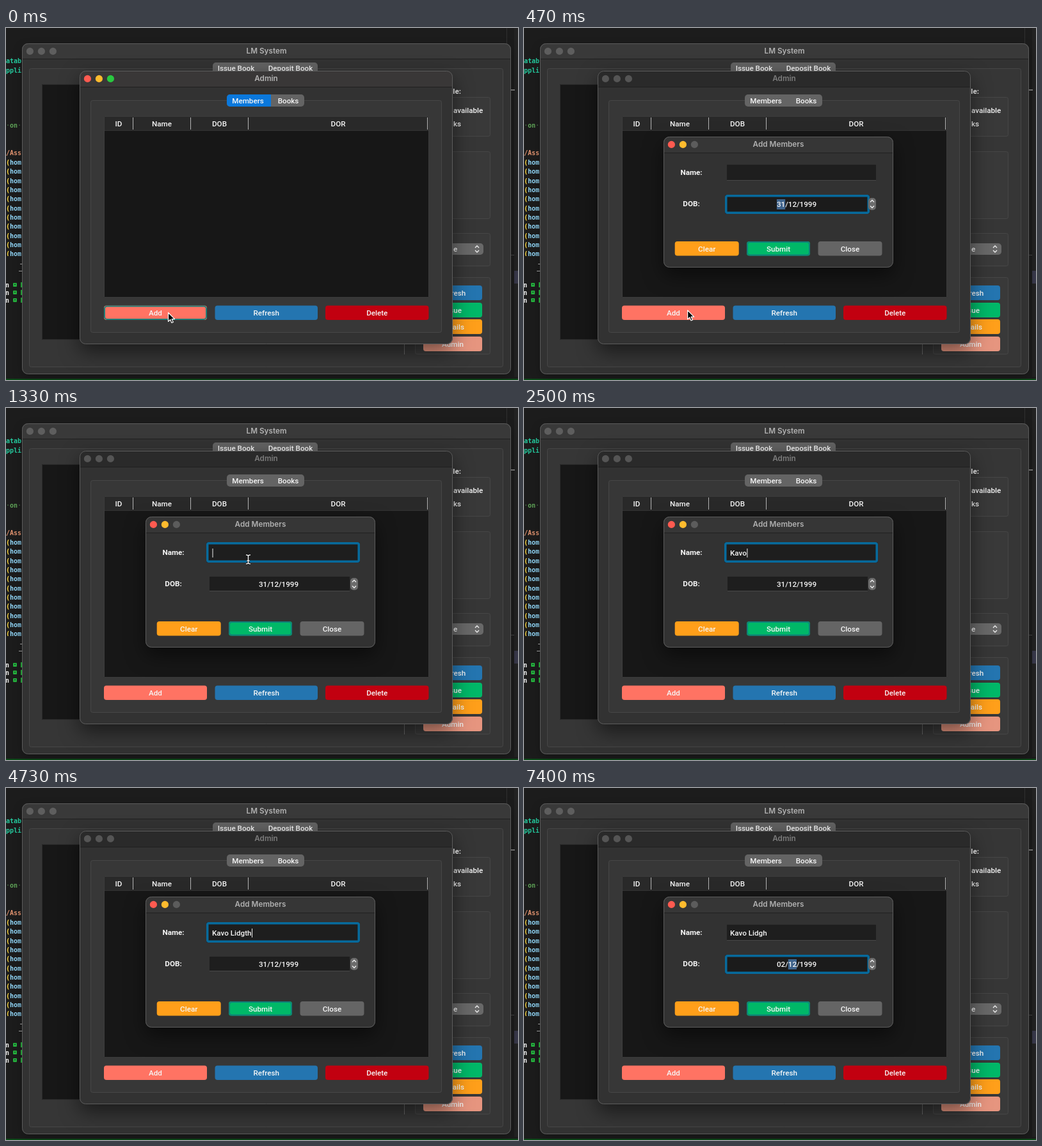
Write an HTML page with a canvas that moves like this. It is 800 px wide and 551 px high and loops after 8 s.

```html
<!DOCTYPE html>
<html lang="en">
<head>
<meta charset="utf-8">
<title>Library admin</title>
<style>
  html, body { margin: 0; width: 100%; height: 100%; overflow: hidden; background: #1c1c1c; }
  canvas { display: block; }
</style>
</head>
<body>
<canvas id="stage" width="800" height="551"></canvas>
<script>
const ctx = document.getElementById('stage').getContext('2d');
const LOOP = 8000, DIALOG_AT = 340, NAME_AT = 1300, DOB_AT = 6000;
const ROBOTO = 'Roboto, sans-serif', INTER = 'Inter, sans-serif', MONO = '"DejaVu Sans Mono", monospace';
const BLUE = '#2475b0', GREEN = '#00b868', ORANGE = '#ff9f1a', RING = '#076a9c', TEAL = '#207f78';

// '<' is a backspace
const KEYS = 'Kavo Lidgth<<<gth<<h';
const KEY_TIMES = [1700, 1930, 2200, 2500, 2630, 2900, 3070, 3230, 3430, 3530, 3630,
  4000, 4170, 4300, 4570, 4630, 4730, 5300, 5470, 5730];

const clamp = v => Math.max(0, Math.min(1, v));

function box(x0, y0, x1, y1, fill, { r = 0, stroke, lw = 1 } = {}) {
  if (fill) {
    ctx.beginPath();
    ctx.roundRect(x0, y0, x1 - x0, y1 - y0, r);
    ctx.fillStyle = fill;
    ctx.fill();
  }
  if (stroke) {
    ctx.beginPath();
    ctx.roundRect(x0 + lw / 2, y0 + lw / 2, x1 - x0 - lw, y1 - y0 - lw, r);
    ctx.strokeStyle = stroke;
    ctx.lineWidth = lw;
    ctx.stroke();
  }
}

function setFont(weight = 500, family = ROBOTO, size = 11.65) {
  ctx.font = `${weight} ${size}px ${family}`;
}

function text(s, x, y, { color = '#f6f6f6', weight, family, size, align = 'center' } = {}) {
  setFont(weight, family, size);
  ctx.textAlign = align;
  ctx.fillStyle = color;
  ctx.fillText(s, x, y + 4.3);
}

function button(s, x0, y0, x1, y1, fill, stroke) {
  box(x0, y0, x1, y1, fill, { r: 4, stroke, lw: 2 });
  text(s, (x0 + x1) / 2, (y0 + y1) / 2);
}

function lights(x, y, colors) {
  colors.forEach((c, i) => {
    ctx.beginPath();
    ctx.arc(x + i * 18, y, 5.6, 0, 7);
    ctx.fillStyle = c;
    ctx.fill();
  });
}

function windowFrame(x0, y0, x1, y1, bar, barColor, title, titleColor, colors, shadow = 0.5) {
  ctx.save();
  ctx.shadowColor = `rgba(0,0,0,${shadow})`;
  ctx.shadowBlur = 60 * shadow;
  ctx.shadowOffsetY = 24 * shadow;
  box(x0, y0, x1, y1, '#323232', { r: 9 });
  ctx.restore();
  box(x0, y0, x1, y0 + bar, barColor, { r: [9, 9, 0, 0] });
  box(x0, y0 + bar, x1, y0 + bar + 1, '#202020');
  box(x0, y0, x1, y1, null, { r: 9, stroke: '#5c5c5c' });
  lights(x0 + 12.4, y0 + 12.4, colors);
  text(title, (x0 + x1) / 2, y0 + 12, { color: titleColor, weight: 600, family: INTER, size: 11.75 });
}

function chevrons(x, y, gap) {
  ctx.beginPath();
  for (const d of [-1, 1]) {
    ctx.moveTo(x - 3, y + d * gap);
    ctx.lineTo(x, y + d * (gap + 3));
    ctx.lineTo(x + 3, y + d * gap);
  }
  ctx.strokeStyle = '#f0f0f0';
  ctx.lineWidth = 1.3;
  ctx.stroke();
}

function desktop() {
  box(0, 0, 800, 551, '#1c1c1c');
  box(782, 0, 783, 24, '#303030');
  box(794, 0, 800, 546, '#222');
  box(788, 96, 795, 98, '#777');
  box(788, 355, 794, 356, '#444');
  box(794, 380, 800, 400, '#38384a');
  box(0, 549, 800, 551, '#0c4a18');

  const code = (s, x, y, color) =>
    text(s, x, y, { color, weight: 700, family: MONO, size: 10, align: 'left' });
  code('atab', 0, 51, '#25cda0');
  code('ppli', 0, 66, '#25cda0');
  code('on', 6, 152, '#5fa558');
  code('·', 0, 152, '#3c5c3c');
  code('·', 18, 152, '#3c5c3c');
  code('/Ass', 0, 195, '#e0926f');
  for (let i = 0; i < 11; i++) {
    const y = 209.5 + i * 14.35;
    code('(', 0, y, '#ffd83c');
    code('hom', 6, y, '#92d8fa');
  }
  box(0, 357, 25, 362, '#1c1c1c');
  box(22, 369, 25, 370, '#aaa');
  box(20, 380, 25, 381, '#aaa');
  for (const y of [402, 414, 426]) {
    code('n', -1, y, '#eee');
    box(11, y - 3, 17, y + 3, '#25b03c', { r: 1 });
    box(13, y - 1, 15, y, '#123');
    box(23, y - 4, 25, y + 4, '#25b03c');
  }
}

function mainWindow() {
  const gray = '#5e5e5e', edge = '#464646';
  windowFrame(25, 24, 789, 542, 24, '#393939', 'LM System', '#b2b2b2', [gray, gray, gray], 0.25);
  box(36, 63, 777, 531, '#363636', { r: 3, stroke: edge });
  box(56, 88, 622, 488, '#171717', { stroke: '#2a2a2a' });
  box(622, 480, 623, 511, '#686868');
  box(323, 54, 487, 73, '#626262', { r: 5 });
  text('Issue Book', 359.5, 63);
  text('Deposit Book', 444.5, 63);

  for (const [y0, y1] of [[108, 170], [193, 299], [321, 373], [390, 511]])
    box(639, y0, 757, y1, '#393939', { r: 3, stroke: edge });
  text('Available:', 711, 99, { weight: 700, align: 'right' });
  text('available', 699, 129, { align: 'left' });
  text('ks', 699, 150, { align: 'left' });
  box(652, 337, 746, 355, '#686868', { r: 5 });
  text('e', 699, 346, { align: 'left' });
  chevrons(736, 346, 2);
  button('Refresh', 652, 403, 744, 426, BLUE);
  button('Issue', 652, 430, 744, 453, GREEN);
  button('Details', 652, 456, 744, 479, ORANGE);
  button('Admin', 652, 483, 744, 506, '#e6957f');
}

function adminWindow(active) {
  const colors = active ? ['#ff5a50', '#ffbb2e', '#2ac840'] : ['#555', '#555', '#555'];
  windowFrame(115, 67, 698, 495, 25, active ? '#393737' : '#2a2a2a', 'Admin',
    active ? '#b4b4b4' : '#7c7c7c', colors);
  box(132, 113, 681, 477, '#373737', { r: 3, stroke: '#474747' });

  box(345, 104, 466, 123, '#646464', { r: 5 });
  if (active) box(345, 104, 414, 123, '#0a78dc', { r: [5, 0, 0, 5] });
  text('Members', 378, 114);
  text('Books', 441, 114);

  box(153, 138, 661, 422, '#171717', { stroke: '#3c3c3c' });
  box(154, 139, 660, 160, '#292929');
  box(154, 160, 660, 161, '#343434');
  for (const x of [198, 288, 378, 658]) box(x, 140, x + 1, 159, '#b4b4b4');
  [['ID', 176], ['Name', 243.5], ['DOB', 333.5], ['DOR', 519]]
    .forEach(([s, x]) => text(s, x, 149.3));

  button('Add', 153, 434.5, 314, 457, '#ff7363', active && TEAL);
  button('Refresh', 326.5, 434.5, 487, 457, BLUE);
  button('Delete', 499, 434.5, 660.5, 457, '#c20010');
}

function typedName(t) {
  let s = '';
  KEY_TIMES.forEach((at, i) => {
    if (t >= at) s = KEYS[i] === '<' ? s.slice(0, -1) : s + KEYS[i];
  });
  return s;
}

function nameField(t, focused) {
  const s = typedName(t);
  box(317, 214, 550, 239, '#1e1e1e');
  box(317, 238, 550, 239, '#484848');
  if (focused) box(313, 210, 553, 242, '#1e1e1e', { r: 2, stroke: RING, lw: 3.5 });
  text(s, 322, 227, { align: 'left' });
  if (focused) {
    const x = 322.5 + ctx.measureText(s).width;
    box(x, 220, x + 1, 234, '#eee');
  }
}

function dobField(t, focused) {
  const s = t < 7130 ? '31/12/1999' : t < 7400 ? '0/12/1999' : '02/12/1999';
  box(318, 264, 537, 287, '#1e1e1e');
  box(318, 286, 537, 287, '#484848');
  if (focused) box(314, 261, 540, 291, '#1b1b1b', { r: 2, stroke: RING, lw: 3.5 });
  setFont();
  const width = part => ctx.measureText(part).width;
  const left = 426 - width(s) / 2;
  if (focused) {
    if (s[1] === '/') {
      const x = left + width('0');
      box(x, 269, x + 1, 283, '#eee');
    } else {
      const from = t < 7130 ? 0 : 3;
      box(left + width(s.slice(0, from)), 268, left + width(s.slice(0, from + 2)), 284, '#3f638b');
    }
  }
  text(s, left, 276, { align: 'left' });
  box(538, 266, 550, 285, '#6c6c6c', { r: 5 });
  chevrons(544, 275.5, 3);
}

function dialog(t) {
  if (t < DIALOG_AT) return;
  const scale = Math.min(1, 0.698 + (t - 400) / 70 * 0.302);
  ctx.save();
  ctx.globalAlpha = clamp((t - DIALOG_AT) / 82);
  ctx.translate(397.5, 274);
  ctx.scale(scale, scale);
  ctx.translate(-397.5, -274);
  windowFrame(218, 170, 577, 375, 25, '#363636', 'Add Members', '#b0b0b0',
    ['#ff5a50', '#ffbb2e', '#5c5c5c']);
  text('Name:', 261.5, 226, { weight: 700 });
  text('DOB:', 261.5, 275, { weight: 700 });
  nameField(t, t >= NAME_AT && t < DOB_AT);
  dobField(t, t < NAME_AT || t >= DOB_AT);
  button('Clear', 235.7, 334, 335.7, 356.4, ORANGE);
  button('Submit', 348, 334, 447, 356.4, GREEN, '#10807a');
  button('Close', 459.5, 334, 559.5, 356.4, '#656565');
  ctx.restore();
}

const ARROW = new Path2D('M0 0V14L3.2 11L5.4 16L7.8 15L5.6 10.2H10Z');
const BEAM = new Path2D('M-3.5 -7Q0 -7 0 -5Q0 -7 3.5 -7M0 -5V5M-3.5 7Q0 7 0 5Q0 7 3.5 7M-2 2H2');

function pointer(t) {
  if (t >= KEY_TIMES[0]) return;
  const u = (1 - Math.cos(Math.PI * clamp((t - 400) / 850))) / 2;
  const x = 253.5 + 125 * u, y = 445.5 - 208.5 * u;
  ctx.save();
  ctx.translate(x, y);
  ctx.lineJoin = 'round';
  if (y < 239) {
    ctx.strokeStyle = '#111';
    ctx.lineWidth = 3.4;
    ctx.stroke(BEAM);
    ctx.strokeStyle = '#eee';
    ctx.lineWidth = 1.5;
    ctx.stroke(BEAM);
  } else {
    ctx.fillStyle = '#000';
    ctx.fill(ARROW);
    ctx.strokeStyle = '#fff';
    ctx.lineWidth = 1.2;
    ctx.stroke(ARROW);
  }
  ctx.restore();
}

function draw() {
  const t = performance.now() % LOOP;
  desktop();
  mainWindow();
  adminWindow(t < DIALOG_AT);
  dialog(t);
  pointer(t);
  requestAnimationFrame(draw);
}
draw();
</script>
</body>
</html>
```
